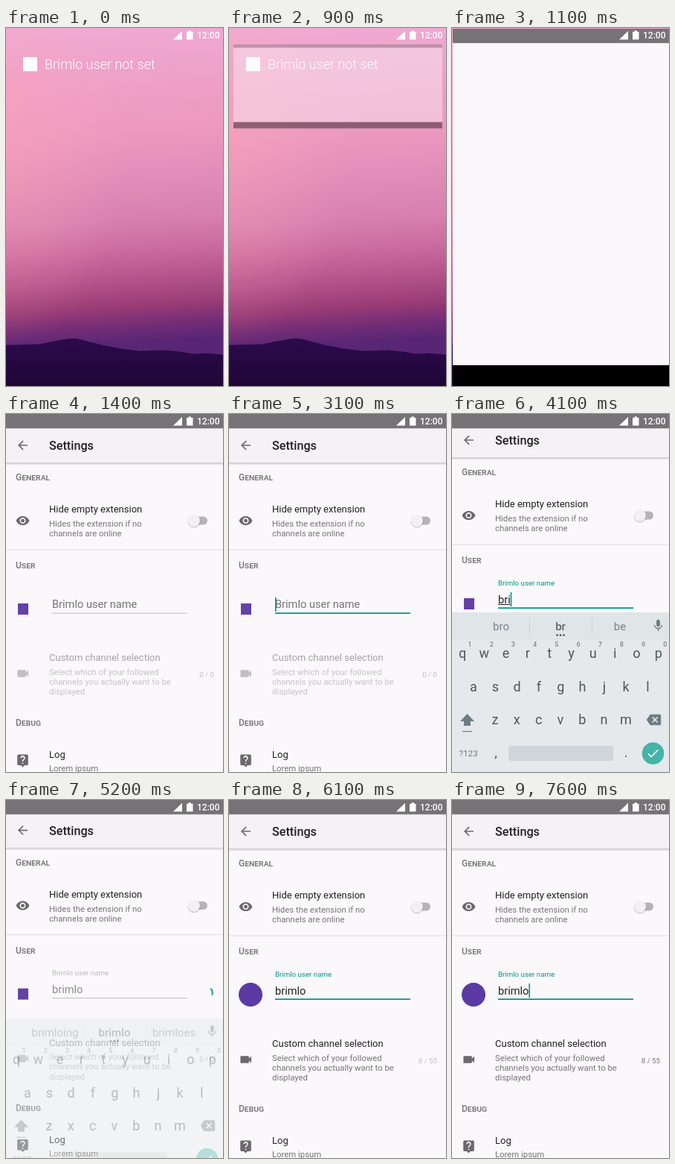
An HTML page for the animation above (8 s loop, 292 by 480 pixels).

```html
<!DOCTYPE html>
<html lang="en">
<head>
<meta charset="utf-8">
<title>Settings</title>
<style>
html, body { margin: 0; width: 100%; height: 100%; overflow: hidden; background: #faf8fb; }
svg { display: block; width: 100%; height: 100%; }
text { font-family: Roboto, "Noto Sans", sans-serif; }
.title { font-size: 13px; fill: #212121; }
.sub { font-size: 11.35px; fill: #757575; }
.head { font-size: 12px; font-weight: 500; font-variant: small-caps; fill: #757575; }
.icon { fill: #6b696c; }
.small { font-size: 9.73px; text-anchor: end; }
.key { font-size: 18px; fill: #4a575d; text-anchor: middle; }
.num { font-size: 9px; font-weight: 500; fill: #7b878d; text-anchor: middle; }
.word { font-size: 15px; fill: #78848a; text-anchor: middle; }
.field { font-size: 14.6px; }

#window, #content, #nav, #page, #board, #hint, #line, #typed, #spin, #badge, #avatar, #custom, #none, #total {
  animation: 8s linear infinite both;
}
#window { animation-name: open; }
#content { animation-name: content; }
#nav { animation-name: nav; transform-origin: 0 480px; }
#page { animation-name: page; }
#board { animation-name: board; }
#hint { animation-name: hint; }
#line { animation-name: line; }
#typed { animation-name: typed; }
#spin { animation-name: spin; transform-origin: 270px 260px; }
#badge { animation-name: leave; }
#avatar { animation-name: enter; }
#custom { animation-name: custom; }
#none { animation-name: none-out; }
#total { animation-name: total-in; }

@keyframes open {
  0%, 6.2% { opacity: 0; transform: translate(8px, 22px) scale(.945, .16); }
  10% { opacity: .15; transform: translate(7px, 22px) scale(.955, .18); }
  11.25% { opacity: .4; transform: translate(6px, 22px) scale(.962, .231); }
  12.5% { opacity: .8; transform: translate(3px, 11px) scale(.98, .62); }
  13.75% { opacity: 1; transform: translate(1px, 1px) scale(.997, .998); }
  15%, 100% { opacity: 1; transform: translate(0, 0) scale(1, 1); }
}
@keyframes content { 0%, 14% { opacity: 0; } 17.5%, 100% { opacity: 1; } }
@keyframes nav {
  0%, 11.25% { opacity: 1; transform: scaleY(1.3); }
  13.75%, 14% { opacity: 1; transform: scaleY(1); }
  15%, 100% { opacity: 0; transform: scaleY(1); }
}
@keyframes page {
  0%, 39.5% { transform: translateY(0); }
  44%, 62.5% { transform: translateY(-7px); }
  65% { transform: translateY(-1.4px); }
  66%, 100% { transform: translateY(0); }
}
@keyframes board {
  0%, 39% { opacity: 0; transform: translateY(50px); }
  42% { opacity: .6; transform: translateY(20px); }
  45%, 62.6% { opacity: 1; transform: translateY(0); }
  65% { opacity: .38; transform: translateY(26.5px); }
  67%, 100% { opacity: 0; transform: translateY(50px); }
}
@keyframes hint {
  0%, 39% { transform: translate(62px, 260px) scale(1); fill: #757575; }
  42%, 62.4% { transform: translate(62px, 236.7px) scale(.667); fill: #009688; }
  62.5%, 70% { transform: translate(62px, 236.7px) scale(.667); fill: #bbb9bc; }
  71.5%, 100% { transform: translate(62px, 236.7px) scale(.667); fill: #009688; }
}
@keyframes line {
  0%, 38.5% { opacity: 0; }
  38.6%, 62.4% { opacity: 1; }
  62.5%, 70% { opacity: 0; }
  71.5%, 100% { opacity: 1; }
}
@keyframes typed {
  0%, 62.4% { fill: #212121; }
  62.5%, 70% { fill: #8f8d90; }
  71.5%, 100% { fill: #212121; }
}
@keyframes spin {
  0%, 63.5% { opacity: 0; transform: rotate(-90deg); stroke-dasharray: 8 100; }
  63.6% { opacity: 1; transform: rotate(-90deg); stroke-dasharray: 8 100; }
  65% { opacity: 1; transform: rotate(-50deg); stroke-dasharray: 20 100; }
  68% { opacity: 1; transform: rotate(60deg); stroke-dasharray: 70 100; }
  71.2% { opacity: 1; transform: rotate(300deg); stroke-dasharray: 10 100; }
  71.3%, 100% { opacity: 0; transform: rotate(300deg); stroke-dasharray: 10 100; }
}
@keyframes leave { 0%, 70% { opacity: 1; } 72.4%, 100% { opacity: 0; } }
@keyframes enter { 0%, 70% { opacity: 0; } 72.4%, 100% { opacity: 1; } }
@keyframes custom { 0%, 70% { opacity: .4; } 72.4%, 100% { opacity: 1; } }
@keyframes none-out { 0%, 73% { opacity: 1; } 75.5%, 100% { opacity: 0; } }
@keyframes total-in { 0%, 74.5% { opacity: 0; } 78.75%, 100% { opacity: 1; } }
</style>
</head>
<body>
<svg viewBox="0 0 292 480" preserveAspectRatio="none">
  <defs>
    <linearGradient id="sky" x1=".48" y1="0" x2=".52" y2="1">
      <stop offset="0" stop-color="#efa9d3"/>
      <stop offset=".12" stop-color="#eea2ca"/>
      <stop offset=".3" stop-color="#ec99c0"/>
      <stop offset=".42" stop-color="#e28db9"/>
      <stop offset=".54" stop-color="#d780b0"/>
      <stop offset=".62" stop-color="#cb6c9f"/>
      <stop offset=".71" stop-color="#b3528a"/>
      <stop offset=".78" stop-color="#993c76"/>
      <stop offset=".83" stop-color="#762e76"/>
      <stop offset=".88" stop-color="#592676"/>
    </linearGradient>
    <radialGradient id="glow" cx="0" cy=".34" r=".55">
      <stop offset="0" stop-color="#ffa6b4" stop-opacity=".4"/>
      <stop offset="1" stop-color="#ffa6b4" stop-opacity="0"/>
    </radialGradient>
    <linearGradient id="hills" x1="0" y1="0" x2="0" y2="1">
      <stop offset="0" stop-color="#2c0b4c"/>
      <stop offset="1" stop-color="#1f0636"/>
    </linearGradient>
    <linearGradient id="shade" x1="0" y1="0" x2="0" y2="1">
      <stop offset="0" stop-color="#000" stop-opacity=".2"/>
      <stop offset="1" stop-color="#000" stop-opacity="0"/>
    </linearGradient>
  </defs>

  <!-- home screen -->
  <rect width="292" height="480" fill="url(#sky)"/>
  <rect width="292" height="480" fill="url(#glow)"/>
  <path fill="url(#hills)" d="M0 425L45 424Q62 420 75 418Q90 415 100 417.5L125 424Q145 428 155 430L180 433L215 432L235 434L252 437L270 436L292 438V480H0Z"/>
  <rect x="23" y="39" width="19" height="19" fill="#fff"/>
  <text x="52" y="55" font-size="18" font-weight="300" fill="#fff">Brimlo user not set</text>

  <g id="window">
    <rect width="292" height="480" fill="#faf8fb"/>
    <g id="content">
      <g id="page">
        <rect y="65" width="292" height="4" fill="url(#shade)"/>
        <rect y="19" width="292" height="46" fill="#f4f2f5"/>
        <path class="icon" data-at="22.5 42" d="M20 11H7.83l5.59-5.59L12 4l-8 8 8 8 1.41-1.41L7.83 13H20v-2z"/>
        <text x="58" y="48.2" font-size="16.2" font-weight="500" fill="#212121">Settings</text>

        <text class="head" x="13" y="89">General</text>
        <path class="icon" data-at="22.5 143" d="M12 4.5C7 4.5 2.73 7.61 1 12c1.73 4.39 6 7.5 11 7.5s9.27-3.11 11-7.5c-1.73-4.39-6-7.5-11-7.5zM12 17c-2.76 0-5-2.24-5-5s2.24-5 5-5 5 2.24 5 5-2.24 5-5 5zm0-8c-1.66 0-3 1.34-3 3s1.34 3 3 3 3-1.34 3-3-1.34-3-3-3z"/>
        <text class="title" x="58" y="132">Hide empty extension</text>
        <text class="sub" x="58" y="151">Hides the extension if no</text>
        <text class="sub" x="58" y="164">channels are online</text>
        <rect x="246" y="137.5" width="25" height="11" rx="5.5" fill="#b5b3b6"/>
        <circle cx="253" cy="144" r="8.6" opacity=".16"/>
        <circle cx="253" cy="143" r="8" fill="#f2f0f2"/>
        <rect y="181.5" width="292" height="1" fill="#dcdadd"/>

        <text class="head" x="13" y="207">User</text>
        <rect id="badge" x="16" y="254" width="14" height="15" fill="#6441a5"/>
        <circle id="avatar" cx="29" cy="261" r="16" fill="#5b3ba3"/>
        <text id="hint" class="field">Brimlo user name</text>
        <rect x="62" y="266.6" width="182" height="1" fill="#b9b7ba"/>
        <rect id="line" x="62" y="266.3" width="182" height="1.7" fill="#009688"/>
        <text id="typed" class="field" x="62" y="260.5"></text>
        <rect id="under" x="62" y="262" height="1" fill="#212121"/>
        <rect id="caret" y="246" width="1.6" height="19" fill="#009688"/>
        <circle id="spin" cx="270" cy="260" r="7.8" pathLength="100" fill="none" stroke="#009688" stroke-width="1.8"/>

        <g id="custom">
          <path class="icon" data-at="22.7 348" d="M17 10.5V7c0-.55-.45-1-1-1H4c-.55 0-1 .45-1 1v10c0 .55.45 1 1 1h12c.55 0 1-.45 1-1v-3.5l4 4v-11l-4 4z"/>
          <text class="title" x="58" y="331">Custom channel selection</text>
          <text class="sub" x="58" y="349.5">Select which of your followed</text>
          <text class="sub" x="58" y="362.7">channels you actually want to be</text>
          <text class="sub" x="58" y="376">displayed</text>
        </g>
        <text id="none" class="small" x="280" y="352.5" fill="#bdbbbe">0 / 0</text>
        <text id="total" class="small" x="280" y="352.5" fill="#757575">8 / 55</text>

        <text class="head" x="13" y="418">Debug</text>
        <path class="icon" data-at="22.5 464.5" d="M19 2H5c-1.1 0-2 .9-2 2v14c0 1.1.9 2 2 2h4l3 3 3-3h4c1.1 0 2-.9 2-2V4c0-1.1-.9-2-2-2zm-6 16h-2v-2h2v2zm2.07-7.75l-.9.92C13.45 11.9 13 12.5 13 14h-2v-.5c0-1.1.45-2.1 1.17-2.83l1.24-1.26c.37-.36.59-.86.59-1.41 0-1.1-.9-2-2-2s-2 .9-2 2H8c0-2.21 1.79-4 4-4s4 1.79 4 4c0 .88-.36 1.68-.93 2.25z"/>
        <text class="title" x="58" y="461">Log</text>
        <text class="sub" x="58" y="479">Lorem ipsum</text>
      </g>
    </g>
    <rect width="292" height="19.3" fill="#757375"/>
    <rect id="nav" y="452" width="292" height="28"/>
  </g>

  <g id="board">
    <rect y="266" width="292" height="260" fill="#e5e9eb"/>
    <rect y="266" width="292" height="37" fill="#e0e5e7"/>
    <path d="M104.5 274v20M188.5 274v20" stroke="#cbd1d4"/>
    <g id="words">
      <text class="word" x="66" y="290"></text>
      <text class="word" x="146" y="290" style="font-weight:500;fill:#5b686e"></text>
      <text class="word" x="226" y="290"></text>
    </g>
    <g id="dots" fill="#37474f">
      <circle cx="141.5" cy="296.5" r="1.3"/><circle cx="146" cy="296.5" r="1.3"/><circle cx="150.5" cy="296.5" r="1.3"/>
    </g>
    <g fill="#6f7c82">
      <path data-at="277.5 283.5" d="M12 14c1.66 0 2.99-1.34 2.99-3L15 5c0-1.66-1.34-3-3-3S9 3.34 9 5v6c0 1.66 1.34 3 3 3zm5.3-3c0 3-2.54 5.1-5.3 5.1S6.7 14 6.7 11H5c0 3.41 2.72 6.23 6 6.72V21h2v-3.28c3.28-.48 6-3.3 6-6.72h-1.7z"/>
      <path data-at="271.5 410" d="M22 3H7c-.69 0-1.23.35-1.59.88L0 12l5.41 8.11c.36.53.9.89 1.59.89h15c1.1 0 2-.9 2-2V5c0-1.1-.9-2-2-2zm-3 12.59L17.59 17 14 13.41 10.41 17 9 15.59 12.59 12 9 8.41 10.41 7 14 10.59 17.59 7 19 8.41 15.41 12 19 15.59z"/>
      <path d="M20.5 402L30 412H25V418H16V412H11Z"/>
      <rect x="14" y="425" width="13" height="1.2"/>
      <text x="9.5" y="459" font-size="11.7">?123</text>
    </g>
    <rect x="76" y="445" width="141" height="20" rx="2" fill="#cfd5d8"/>
    <text class="key" x="59" y="460">,</text>
    <text class="key" x="234" y="460">.</text>
    <circle cx="270.5" cy="455" r="14.8" fill="#45b3a8"/>
    <path data-at="270.5 455" fill="#fff" d="M9 16.17L4.83 12l-1.42 1.41L9 19 21 7l-1.41-1.41z"/>
  </g>

  <!-- status icons -->
  <g fill="#fff">
    <path d="M237 4V15.5H225Z"/>
    <path d="M243 5H245.5V3.5H249V5H251.5V15.5H243Z"/>
    <text x="257" y="14" font-size="12" font-weight="500">12:00</text>
  </g>
</svg>
<script>
const $ = id => document.getElementById(id);
const board = $('board'), typed = $('typed'), under = $('under'), caret = $('caret');
const words = [...$('words').children];
const LOOP = 8000;

// 24-unit icons, centred on their data-at point
for (const icon of document.querySelectorAll('[data-at]')) {
  icon.setAttribute('transform', `translate(${icon.dataset.at}) scale(.811) translate(-12 -12)`);
}

function addText(cls, x, y, str) {
  const el = document.createElementNS('http://www.w3.org/2000/svg', 'text');
  el.setAttribute('class', cls);
  el.setAttribute('x', x);
  el.setAttribute('y', y);
  el.textContent = str;
  board.append(el);
}
function addRow(keys, x, y) {
  [...keys].forEach((k, i) => addText('key', x + i * 29.3, y, k));
}
addRow('qwertyuiop', 14, 327);
addRow('asdfghjkl', 29, 372);
addRow('zxcvbnm', 58, 416);
[...'1234567890'].forEach((n, i) => addText('num', 24 + i * 29.2, 312, n));

const name = 'brimlo';
const strokes = [3900, 4000, 4100, 4200, 4500, 4600];
const hints = [
  [4000, 'bro br be'],
  [4300, 'brimming brim brims'],
  [4700, 'brimloing brimlo brimloes']
];

function caretOn(t) {
  if (t < 3100 || (t >= 5000 && t < 5600)) return false;
  return t < 5000 || Math.floor((t - 5600) / 500) % 2 === 0;
}

function draw(t) {
  typed.textContent = name.slice(0, strokes.filter(s => t >= s).length);
  const width = typed.textContent ? typed.getComputedTextLength() : 0;
  caret.setAttribute('x', 62 + width);
  caret.setAttribute('visibility', caretOn(t) ? 'visible' : 'hidden');
  under.setAttribute('width', t < 5000 ? width : 0);
  const shown = hints.filter(h => t >= h[0]).pop();
  const list = shown ? shown[1].split(' ') : [];
  words.forEach((w, i) => { w.textContent = list[i] || ''; });
  $('dots').setAttribute('visibility', shown ? 'visible' : 'hidden');
}

let start;
function tick(now) {
  start ??= now;
  draw((now - start + 20) % LOOP);
  requestAnimationFrame(tick);
}
draw(0);
requestAnimationFrame(tick);
</script>
</body>
</html>
```
